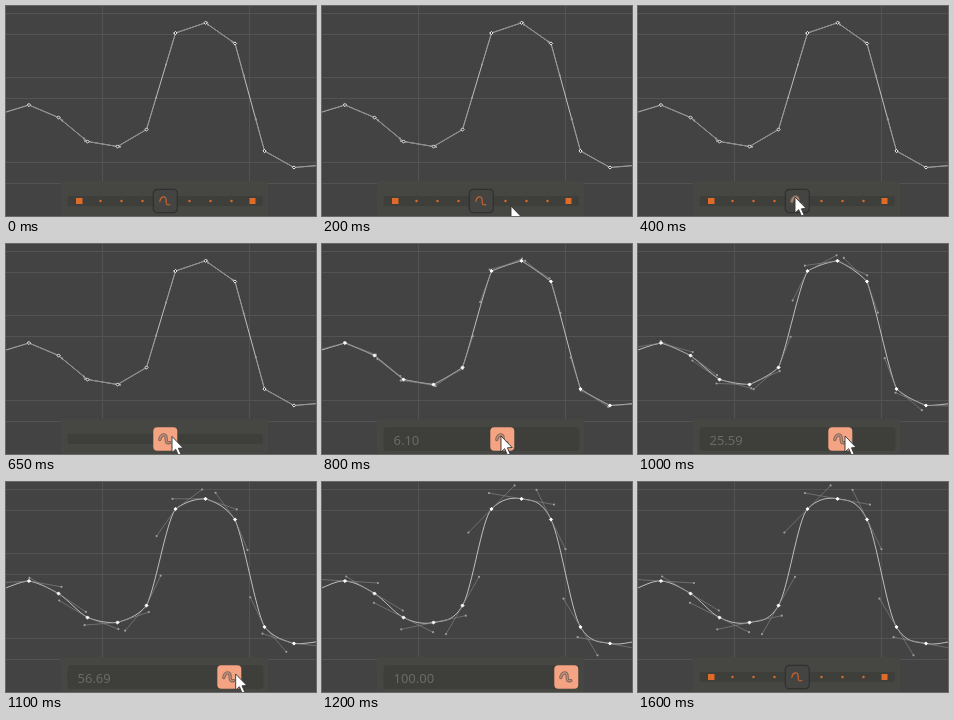
Animation of 310x210 px, one loop 2 s. Source, as an HTML page:

```html
<!DOCTYPE html>
<html lang="en">
<head>
<meta charset="utf-8">
<title>Curve smoothing slider</title>
<style>
  html, body { margin: 0; width: 100%; height: 100%; overflow: hidden; background: #434344; }
  svg { display: block; width: 310px; height: 210px; }
  .grid { stroke: #535353; fill: none; }
  #curve { fill: none; stroke: #f4f4f4; stroke-width: .7; }
  #handles { fill: none; stroke: #858585; stroke-width: .65; }
  #tips { fill: #9c9c9c; }
  #keys { fill: #333; stroke: #fff; stroke-width: .9; }
  #keys.on { fill: #fff; }
  #panel { fill: #464643; }
  #track, #field { fill: #3e3e3b; }
  #marks { fill: #de6b27; }
  #value { font: 500 13px "Noto Sans", "Open Sans", sans-serif; fill: #6a6a67; }
  #face { fill: #444442; stroke: #303030; stroke-width: 1.2; }
  .icon { fill: none; stroke-linecap: round; stroke-linejoin: round; }
  #outer { stroke: none; stroke-width: 3.4; }
  #inner { stroke: #cb622e; stroke-width: 1.2; }
  .hover #outer { stroke: #75675e; }
  .hover #inner { stroke: #c08a6c; }
  .pressed #face { fill: #f5a483; stroke: none; }
  .pressed #outer { stroke: #85685a; }
  .pressed #inner { stroke: #c6937b; }
  #cursor { fill: #fff; stroke: #333; stroke-width: .9; stroke-linejoin: round; }
</style>
</head>
<body>
<svg viewBox="0 0 310 210">
  <path class="grid" d="M0 7.5H310M0 28.5H310M0 71.5H310M0 92.5H310M0 156.5H310M0 177.5H310M96.5 0V210M243.5 0V210"/>
  <path id="curve"/>
  <path id="handles"/>
  <path id="tips"/>
  <path id="keys"/>
  <rect id="panel" x="55" y="175" width="207" height="40" rx="2"/>
  <rect id="track" x="61.5" y="190" width="195.5" height="10" rx="2"/>
  <rect id="field" x="61.5" y="183" width="196" height="24" rx="4"/>
  <g id="marks">
    <rect x="70" y="192" width="6.5" height="6"/>
    <rect x="243.5" y="192" width="6" height="6"/>
  </g>
  <text id="value" x="71.5" y="200.5"></text>
  <g id="button">
    <rect id="face" x="-12" y="-11.7" width="24" height="23.4" rx="4"/>
    <path id="outer" class="icon"/>
    <path id="inner" class="icon"/>
  </g>
  <path id="cursor" d="M0 0V16L3.7 12.7L6.4 19L9.1 17.9L6.4 11.8L11.2 11.5Z"/>
</svg>
<script>
const LOOP = 2000, STEP = 50, REACH = 33, TRAVEL = 85, HOME = 159.3;
const PRESS = 550, RELEASE = 1550, IDLE = 1600;

// x, y and the angle in degrees of the smooth tangent
const KEYS = [
  [-6.5, 108, -14], [23, 99, 3.5], [52.5, 111.5, 31], [81.5, 135.5, 26.5],
  [111.5, 140.5, -12], [140.5, 123.5, -60], [169.5, 27, -45.5], [199.5, 16.8, 10],
  [229, 37.5, 64], [258.5, 145, 59], [288, 161.5, 11], [317.5, 159, -5]
];
// time, then values
const DRAG = [[650, 0], [800, 21], [1000, 43], [1200, TRAVEL]];
const POINTER = [[50, 213, 207], [400, 157, 191], [550, 157, 191], [650, 166, 192.5],
  [800, 179, 192], [1000, 207, 192], [1150, 241, 192]];

const $ = id => document.getElementById(id);
const show = (id, on) => $(id).setAttribute("visibility", on ? "visible" : "hidden");
const draw = (id, d) => $(id).setAttribute("d", d);
const mix = (a, b, k) => a + (b - a) * k;
const pt = p => p[0].toFixed(2) + " " + p[1].toFixed(2);

function track(stops, t) {
  if (t <= stops[0][0]) return stops[0].slice(1);
  for (let i = 1; i < stops.length; i++) {
    const a = stops[i - 1], b = stops[i];
    if (t <= b[0]) return a.slice(1).map((v, j) => mix(v, b[j + 1], (t - a[0]) / (b[0] - a[0])));
  }
  return stops[stops.length - 1].slice(1);
}

// Handle vector along a segment, turned towards the key's tangent
function handle(from, to, key, smooth) {
  const straight = Math.atan2(to[1] - from[1], to[0] - from[0]);
  const angle = mix(straight, key[2] * Math.PI / 180, smooth);
  return [Math.cos(angle) * REACH, Math.sin(angle) * REACH];
}

function drawCurve(smooth) {
  let curve = "M" + pt(KEYS[0]), lines = "", tips = "";
  const addHandle = (key, v, sign) => {
    const end = [key[0] + v[0] * sign, key[1] + v[1] * sign];
    lines += `M${pt(key)}L${pt(end)}`;
    tips += `M${pt([end[0] - 1.1, end[1]])}a1.1 1.1 0 1 0 2.2 0a1.1 1.1 0 1 0 -2.2 0`;
  };
  for (let i = 1; i < KEYS.length; i++) {
    const a = KEYS[i - 1], b = KEYS[i];
    const out = handle(a, b, a, smooth), back = handle(a, b, b, smooth);
    // Control points sit at one and two thirds of the segment's width
    const third = (b[0] - a[0]) / 3;
    curve += `C${pt([a[0] + third, a[1] + out[1] / out[0] * third])} ` +
      `${pt([b[0] - third, b[1] - back[1] / back[0] * third])} ${pt(b)}`;
    if (i > 1) addHandle(a, out, 1);
    if (i < KEYS.length - 1) addHandle(b, back, -1);
  }
  draw("curve", curve);
  draw("handles", lines);
  draw("tips", tips);
}

function render(t) {
  const drag = track(DRAG, t)[0], u = drag / TRAVEL;
  const pressed = t >= PRESS && t < IDLE;
  const sliding = drag > 0 && t < RELEASE;
  drawCurve(u ** 1.5);
  $("keys").setAttribute("class", drag > 0 ? "on" : "");

  show("field", sliding);
  show("marks", !pressed);
  $("value").textContent = sliding ? (u * u * 100).toFixed(2) : "";
  $("button").setAttribute("transform", `translate(${HOME + (sliding ? drag : 0)} 195)`);
  $("button").setAttribute("class", pressed ? "pressed" : t >= 350 && t < PRESS ? "hover" : "");

  show("cursor", t >= 50 && t < 1200);
  $("cursor").setAttribute("transform", `translate(${track(POINTER, t)})`);
}

draw("keys", KEYS.map(k => `M${pt([k[0], k[1] - 1.6])}l1.6 1.6l-1.6 1.6l-1.6 -1.6Z`).join(""));
for (const id of ["outer", "inner"]) draw(id, "M-5.5 .5C-4.5 -5 .8 -5.8 .8 -1S1.5 4.2 4.5 3.6");
for (const x of [94.5, 115.5, 136.5, 183.5, 204.5, 225.5]) {
  const dot = document.createElementNS("http://www.w3.org/2000/svg", "circle");
  dot.setAttribute("cx", x);
  dot.setAttribute("cy", 195);
  dot.setAttribute("r", 1.2);
  $("marks").append(dot);
}

const start = performance.now();
function tick() {
  const t = (performance.now() - start) % LOOP;
  render(Math.floor(t / STEP) * STEP);
  requestAnimationFrame(tick);
}
tick();
</script>
</body>
</html>
```
